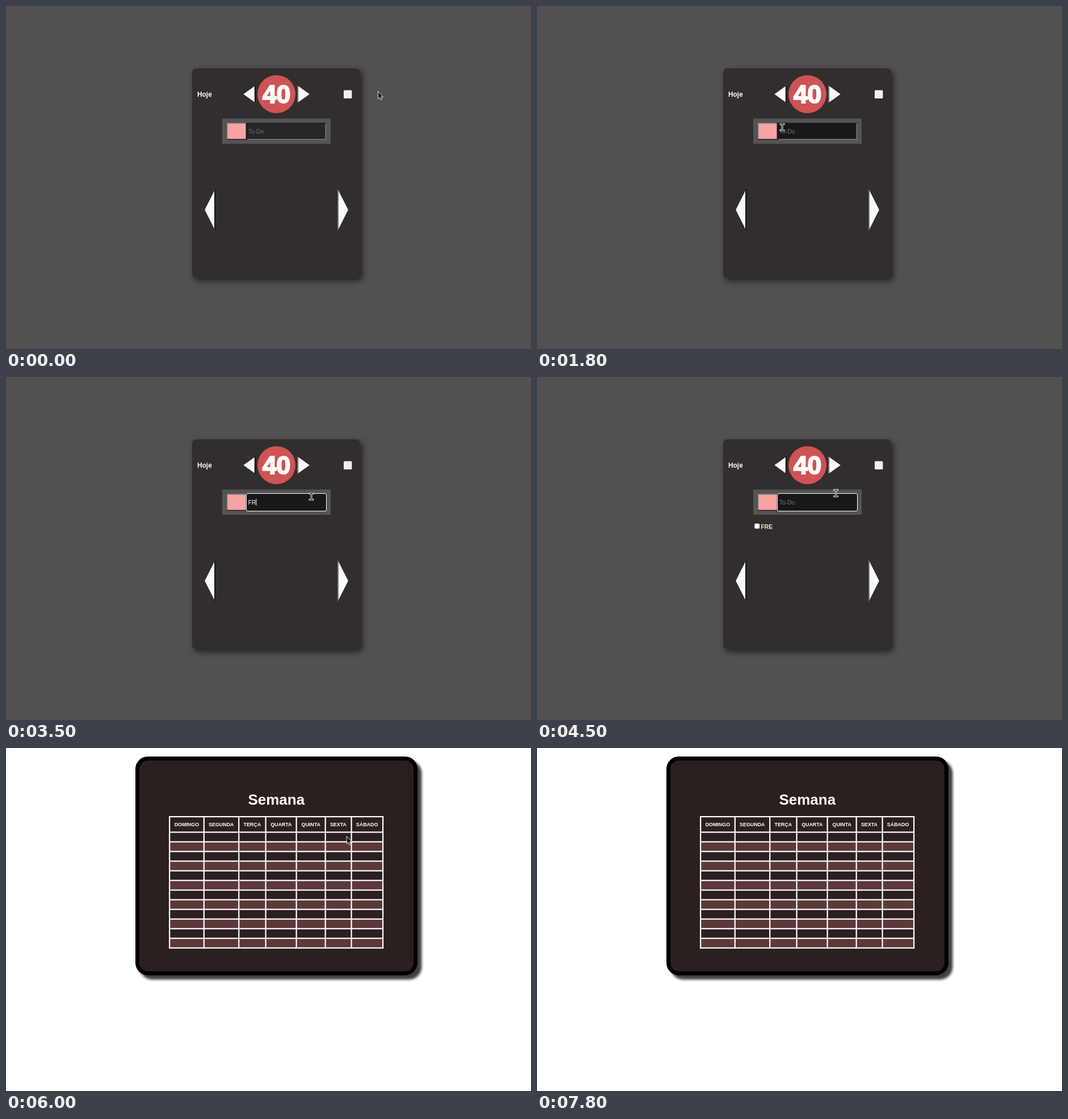
An HTML page that plays this animation: 925x605 px, repeating every 8.4 s.

```html
<!DOCTYPE html>
<html lang="pt">
<head>
<meta charset="utf-8">
<title>Hoje / Semana</title>
<style>
html, body { margin: 0; width: 100%; height: 100%; overflow: hidden; }
.page, svg { position: absolute; left: 0; top: 0; width: 925px; height: 605px; overflow: hidden; }
.box { position: absolute; box-sizing: border-box; }
#day { background: #525051; }
#week { background: #fff; }
#card { left: 328px; top: 110px; width: 296px; height: 370px; border-radius: 7px;
  background: #312e2d; box-shadow: 3.7px 4.5px 11px rgba(0,0,0,.6); }
#board { left: 228px; top: 15px; width: 497px; height: 385.5px; border-radius: 22px;
  border: 7.4px solid #000; background: #2a201f; box-shadow: 7.4px 7.4px 4px rgba(0,0,0,.75); }
text, th { font-family: "Liberation Sans", Arial, sans-serif; }
text { fill: #fff; font-size: 10.36px; }
.b { font-weight: bold; }
table { position: absolute; left: 476.3px; top: 120.2px; border-collapse: collapse;
  transform-origin: 0 0; transform: scale(.74) translateX(-50%); }
th { font-size: 12px; line-height: 14px; padding: 10px; color: #fff; }
th, td { border: 3px solid #fff; }
td { padding: 0; }
tr { height: 23px; }
tr:nth-child(odd) td { background: #5c3939; }
</style>
</head>
<body>
<div id="day" class="page">
  <div id="card" class="box"></div>
  <svg>
    <text class="b" x="337" y="159.8" style="font-size:11.9px">Hoje</text>
    <circle cx="476.5" cy="155.5" r="33.5" fill="#cf5354"/>
    <text class="b" x="476.6" y="171.2" text-anchor="middle" stroke="#fff" stroke-width="2.2" style="font-size:44.4px">40</text>
    <g id="buttons"></g>
    <rect id="toggle" x="595" y="148.5" width="14.4" height="14.4" rx="1.5"/>

    <rect x="381" y="198.5" width="191" height="44.5" fill="#555455"/>
    <rect x="389" y="206" width="35" height="30" fill="#f7a3a3"/>
    <rect id="field" x="424" y="206" width="140" height="30"/>
    <g fill="none" stroke-width="1.5">
      <path d="M389.7 236V206.7H424M424 235.3H563.3V206" stroke="#7d7d7d"/>
      <path d="M389 235.3H423.3V206M424.7 236V206.7H564" stroke="#1c1c1c"/>
    </g>
    <rect id="ring" x="423.5" y="205.5" width="141" height="31" rx="2.5" fill="#181818" stroke="#fff"/>
    <text id="entry" x="426.8" y="224.6"></text>
    <rect id="caret" y="215" width="1" height="11.5" fill="#fff"/>

    <g id="item">
      <rect x="383.2" y="258.5" width="9" height="9" rx="1.7" fill="#fff" stroke="#767676" stroke-width=".7"/>
      <text class="b" x="394.5" y="267.8" style="fill:#ffe4c4">FRE</text>
    </g>
  </svg>
</div>

<div id="week" class="page">
  <div id="board" class="box"></div>
  <svg>
    <text class="b" x="476.3" y="99.5" text-anchor="middle" style="font-size:26px">Semana</text>
  </svg>
  <table id="grid"></table>
</div>

<svg>
  <path id="arrow" d="M0 0V13.4L3 10.6L5 15.4L7.2 14.4L5.2 9.8H9Z" fill="#111" stroke="#fff" stroke-width=".9"/>
  <g id="beam" fill="none" stroke-linecap="square"></g>
</svg>

<script>
const $ = id => document.getElementById(id);
const show = (id, on) => $(id).style.display = on ? '' : 'none';
const clamp = (v, lo, hi) => Math.min(hi, Math.max(lo, v));
const LOOP = 8400, STEP = 100;
const FOCUS = 2600, TYPE = 3100, KEY = 250, ENTER = 4000, PRESS = 5800, SWITCH = 6000, LEAVE = 7800;

// Pointer moves: start, end, destination x, y
const MOVES = [
  [0, 100, 588, 161], [200, 300, 578, 160], [400, 600, 597, 156], [1000, 1100, 604, 156],
  [1300, 1600, 490, 126], [1600, 1900, 403, 258], [1900, 2500, 521.5, 224],
  [3000, 3300, 536, 177], [3300, 3800, 541, 262], [4200, 4500, 526.5, 204.8],
  [4500, 4800, 526, 150], [5100, 5500, 600.3, 155.7], [6800, 7700, 52, -12]
];

function pointer(t) {
  return MOVES.reduce(([px, py], [start, end, x, y]) => {
    const k = clamp((t - start) / (end - start), 0, 1);
    return [px + (x - px) * k, py + (y - py) * k];
  }, [655.5, 150.5]);
}

// Triangular button with a shaded base edge, pointing left (dir -1) or right (dir 1)
function button(base, y, width, half, dir) {
  const edge = 2, tip = base + dir * width;
  const tri = (x, h, fill) => `<path d="M${tip} ${y}L${x} ${y - h}V${y + h}Z" fill="${fill}"/>`;
  return tri(base, half, dir < 0 ? '#151515' : '#767676') +
    tri(base + dir * edge, half * (1 - edge / width), '#fafafa');
}

const MID = 476.5;
$('buttons').innerHTML = [-1, 1].map(dir =>
  button(MID + dir * 36.7, 155.5, 21.5, 15.5, dir) +
  button(MID + dir * 107.5, 359.5, 18.8, 37.5, dir)).join('');

const days = ['DOMINGO', 'SEGUNDA', 'TERÇA', 'QUARTA', 'QUINTA', 'SEXTA', 'SÁBADO'];
$('grid').innerHTML = `<tr>${days.map(d => `<th>${d}</th>`).join('')}</tr>` +
  `<tr>${'<td></td>'.repeat(days.length)}</tr>`.repeat(12);

const serif = y => `M-2.8 ${y}H2.8`;
$('beam').innerHTML = [['#fff', 3], ['#000', 1.1]].map(([color, width]) =>
  `<path d="${serif(-5.6)}${serif(5.6)}M0 -5.6V5.6" stroke="${color}" stroke-width="${width}"/>`).join('');

function draw() {
  const t = Math.floor(performance.now() % LOOP / STEP) * STEP;
  const [x, y] = pointer(t);
  const inside = (left, top, right, bottom) => x > left && x < right && y > top && y < bottom;
  const day = t < SWITCH;
  const overField = day && inside(424, 204, 565, 237);
  const focus = t >= FOCUS && t < PRESS;
  const keys = t < ENTER ? clamp(Math.floor((t - TYPE) / KEY) + 1, 0, 3) : 0;

  show('day', day);
  show('week', !day);
  $('toggle').setAttribute('fill', inside(594, 148, 610, 163) ? '#e5e5e5' : '#f0eff0');
  $('field').setAttribute('fill', overField ? '#181818' : '#272626');
  show('ring', focus);
  show('item', t >= ENTER);

  const entry = $('entry');
  entry.textContent = keys ? 'FRE'.slice(0, keys) : 'To-Do';
  entry.style.fill = keys ? '#fff' : '#757575';
  show('caret', focus && (t < ENTER || (t - ENTER) % 1000 < 500));
  $('caret').setAttribute('x', 426.6 + (keys && entry.getComputedTextLength()));

  show('arrow', !overField && t < LEAVE);
  show('beam', overField);
  $(overField ? 'beam' : 'arrow').setAttribute('transform', `translate(${x} ${y})`);
  requestAnimationFrame(draw);
}
draw();
</script>
</body>
</html>
```
